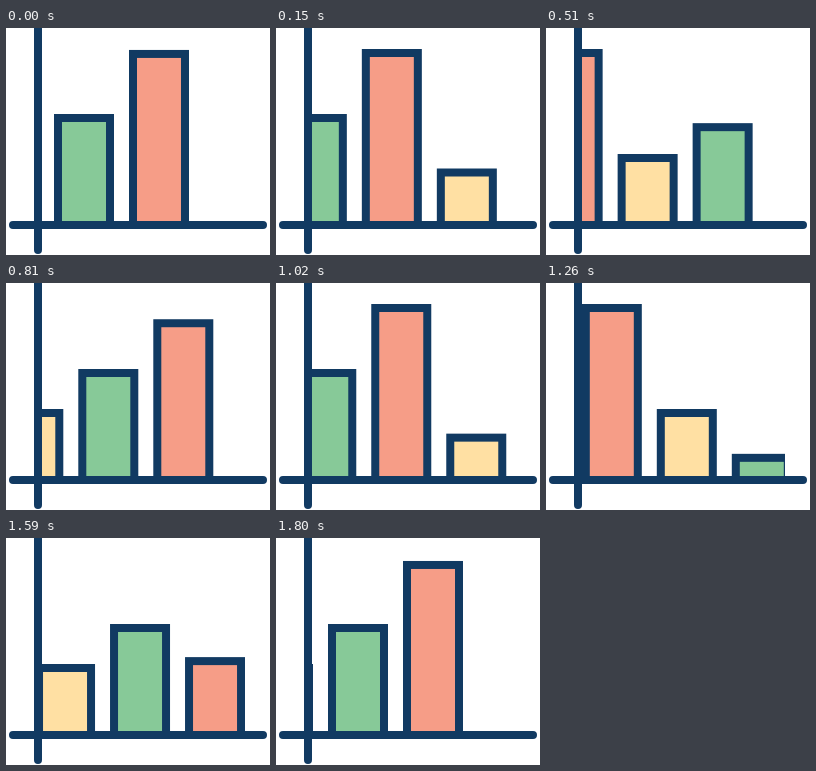
Animation of 264x227 px, one loop 1830 ms. Source, as an HTML page with a canvas:

```html
<!DOCTYPE html>
<html lang="en">
<head>
<meta charset="utf-8">
<title>Scrolling bar chart</title>
<style>
html, body { margin: 0; width: 100%; height: 100%; overflow: hidden; background: #fff; }
canvas { display: block; }
</style>
</head>
<body>
<canvas id="stage" width="264" height="227"></canvas>
<script>
const ctx = document.getElementById('stage').getContext('2d');
const LOOP = 1830, STEP = 30, SPEED = 446 / 1800;
const GAP = 75, WIDTH = 60, EDGE = 8, BASE = 197;
const NAVY = '#113a62';
const KINDS = [
  { color: '#87c998', height: 111 },
  { color: '#f69d87', height: 176 },
  { color: '#ffe0a3', height: 71 }
];

// cubic-bezier(.333, 0, .15, 1), solved by bisection
function ease(p) {
  if (p <= 0) return 0;
  if (p >= 1) return 1;
  let lo = 0, hi = 1;
  for (let i = 0; i < 24; i++) {
    const s = (lo + hi) / 2, r = 1 - s;
    if (r * r * s + 0.45 * r * s * s + s * s * s < p) lo = s;
    else hi = s;
  }
  return lo * lo * (3 - 2 * lo);
}

// A bar grows as it moves in from the right.
function drawBar(x, kind) {
  const h = kind.height * ease((205 - x) / 91.5);
  ctx.fillStyle = NAVY;
  ctx.fillRect(x, BASE - h, WIDTH, h);
  ctx.fillStyle = kind.color;
  ctx.fillRect(x + EDGE, BASE - h + EDGE, WIDTH - 2 * EDGE, Math.max(0, h - EDGE));
}

function drawAxes() {
  ctx.strokeStyle = NAVY;
  ctx.lineWidth = EDGE;
  ctx.lineCap = 'round';
  ctx.beginPath();
  ctx.moveTo(32, -8);
  ctx.lineTo(32, 222);
  ctx.moveTo(7, BASE);
  ctx.lineTo(257, BASE);
  ctx.stroke();
}

function draw(now) {
  const t = Math.floor((now % LOOP) / STEP) * STEP;
  ctx.fillStyle = '#fff';
  ctx.fillRect(0, 0, 264, 227);
  ctx.save();
  ctx.beginPath();
  ctx.rect(32, 0, 207, BASE);
  ctx.clip();
  for (let i = 0; i < 9; i++) {
    const x = 48 + i * GAP - t * SPEED;
    if (x > -WIDTH && x < 239) drawBar(x, KINDS[i % 3]);
  }
  ctx.restore();
  drawAxes();
}

const start = performance.now();
function tick() {
  draw(performance.now() - start);
  requestAnimationFrame(tick);
}
tick();
</script>
</body>
</html>
```
